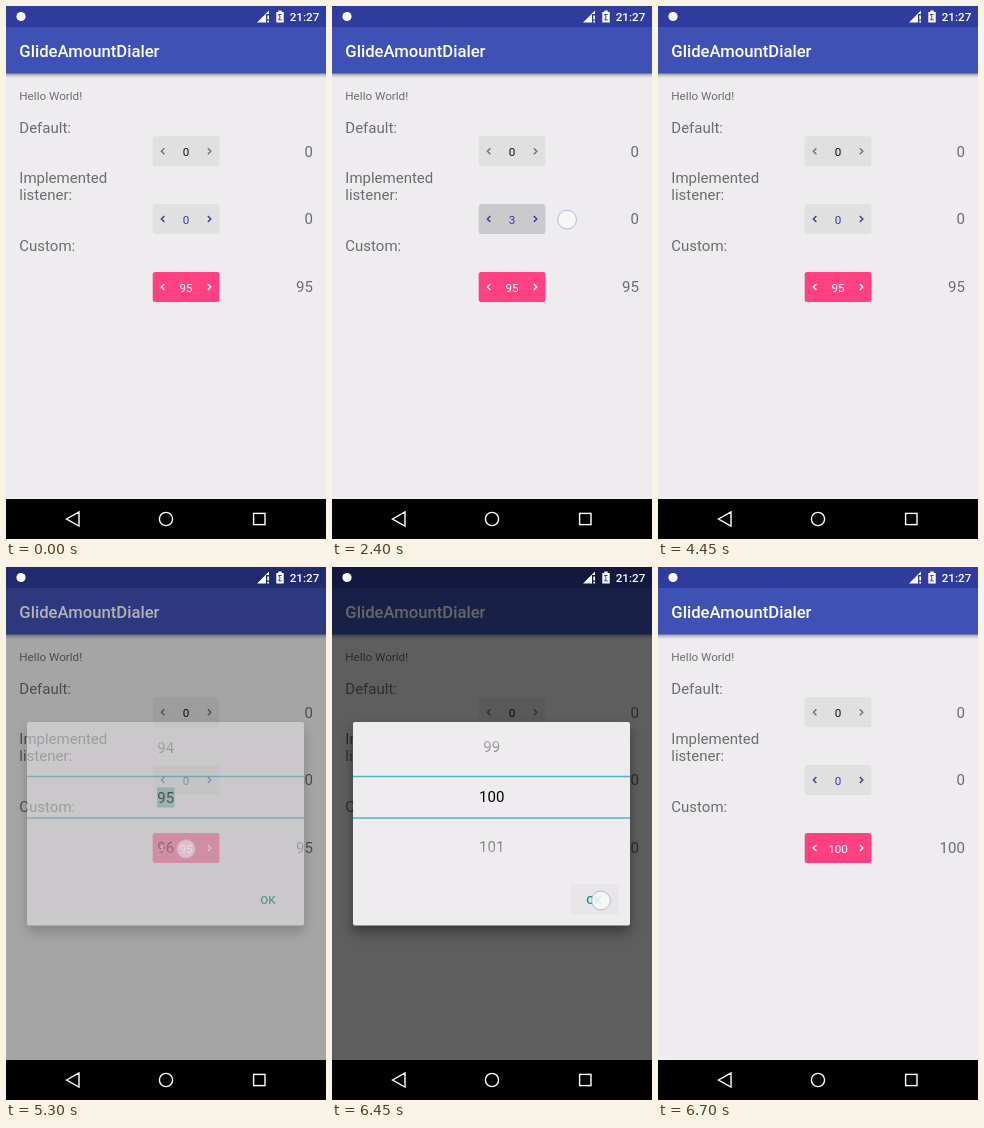
An HTML page for the animation above (6.75 s loop, 320 by 533 pixels).

```html
<!DOCTYPE html>
<html lang="en">
<head>
<meta charset="utf-8">
<title>Number picker demo</title>
<style>
  html, body { margin: 0; width: 100%; height: 100%; overflow: hidden; background: #eeecee; }
  svg { display: block; width: 100%; height: 100%; }
  text { font: 400 15px Roboto, sans-serif; fill: #6d6c6e; }
  .small { font-size: 11.67px; }
  .medium { font-weight: 500; }
  .mid { text-anchor: middle; }
  .end { text-anchor: end; }
  .line { fill: none; stroke: #fff; stroke-width: 1.4; }
  .picker path { fill: none; stroke-width: 1.4; }
  #card { filter: drop-shadow(0 7px 6px rgba(0, 0, 0, .38)); }
  #wheel text { fill: #000; }
</style>
</head>
<body>
<svg viewBox="0 0 320 533">
  <defs>
    <linearGradient id="shade" x2="0" y2="1">
      <stop offset="0" stop-opacity=".34"/>
      <stop offset="1" stop-opacity="0"/>
    </linearGradient>
    <linearGradient id="fade" gradientUnits="userSpaceOnUse" x1="0" y1="156" x2="0" y2="306">
      <stop offset="0" stop-color="#fff" stop-opacity="0"/>
      <stop offset=".45" stop-color="#fff"/>
      <stop offset=".55" stop-color="#fff"/>
      <stop offset="1" stop-color="#fff" stop-opacity="0"/>
    </linearGradient>
    <mask id="edges" maskUnits="userSpaceOnUse" x="21" y="156" width="277" height="150">
      <rect x="21" y="156" width="277" height="150" fill="url(#fade)"/>
    </mask>
  </defs>

  <rect width="320" height="533" fill="#eeecee"/>
  <rect y="67" width="320" height="5" fill="url(#shade)"/>
  <rect width="320" height="21" fill="#303c9d"/>
  <rect y="21" width="320" height="46.5" fill="#3f51b5"/>
  <text class="medium" x="13.3" y="51" style="font-size:16.67px;fill:#fff">GlideAmountDialer</text>

  <text class="small" x="13.3" y="93.5">Hello World!</text>
  <text x="13.3" y="126.5">Default:</text>
  <text x="13.3" y="176.7">Implemented</text>
  <text x="13.3" y="194.3">listener:</text>
  <text x="13.3" y="244.6">Custom:</text>
  <g id="rows"></g>

  <rect id="dim" width="320" height="493" opacity="0"/>

  <circle cx="15" cy="10.5" r="4.6" fill="#fff"/>
  <path d="M251 16.5 263 4.5V8H260V16.5Z" fill="#fff"/>
  <path d="M261.3 9.5h1.7v4h-1.7zM261.3 14.8h1.7v1.7h-1.7z" fill="#fff"/>
  <path d="M270.3 6h2v-1.5h3.4V6h2v10.5h-7.4z" fill="#fff"/>
  <path d="M275.6 8.5h-3l1.6 2.5-1.6 2.8h3.2" fill="none" stroke="#303c9d"/>
  <text class="small medium end" x="313.3" y="15" style="fill:#fff">21:27</text>

  <g id="dialog" opacity="0">
    <rect id="card" x="21" y="155" width="277" height="203.5" rx="2" fill="#eeecee"/>
    <rect id="mark" x="151" y="220.5" width="17.5" height="20" fill="#84c5bd"/>
    <g mask="url(#edges)"><g id="wheel"></g></g>
    <path d="M21 209.5H298M21 251H298" stroke="#55b4ca" stroke-width="1.7"/>
    <rect id="okBg" x="238" y="317" width="49" height="31" rx="2" fill="#e8e6e9"/>
    <text class="small medium mid" x="262" y="336.5" style="fill:#009688">OK</text>
  </g>

  <rect y="493" width="320" height="40"/>
  <path class="line" d="M60.5 513 73 506V520Z"/>
  <circle class="line" cx="160" cy="513" r="6.6"/>
  <rect class="line" x="247.6" y="507.4" width="11.4" height="11.2"/>

  <circle id="touch" r="9.4" fill="#f8f8fb" fill-opacity=".86" stroke="#b3b7d2" opacity="0"/>
</svg>
<script>
const LOOP = 6750, FADE = 200;
const $ = id => document.getElementById(id);
const clamp = (v, a = 0, b = 1) => Math.min(b, Math.max(a, v));
const ramp = (t, a, b) => clamp((t - a) / (b - a));
const mix = (a, b, p) => a + (b - a) * p;

const rows = [
  { y: 145.3, bg: '#e1e0e1', hot: '#cac9cb', ink: '#111', arrow: '#747375', start: 0 },
  { y: 213, bg: '#e1e0e1', hot: '#cac9cb', ink: '#303f9f', arrow: '#303f9f', start: 0 },
  { y: 281, bg: '#ff4081', hot: '#e43973', ink: '#fff', arrow: '#fff', start: 95 }
];

// Finger swipes: down, end of movement, release; x and y ranges; values; pixels per unit
const swipes = [
  { row: 2, down: 100, stop: 550, up: 550, x: [178, 309], y: [284, 279], bulge: 0, from: 95, to: 105, unit: 13 },
  { row: 2, down: 1150, stop: 1500, up: 1500, x: [180, 49], y: [287, 287], bulge: 1, from: 105, to: 95, unit: 13 },
  { row: 1, down: 2250, stop: 2550, up: 2550, x: [180, 311], y: [217, 209], bulge: 0, from: 0, to: 8, unit: 16 },
  { row: 1, down: 3200, stop: 3800, up: 4250, x: [188, 28], y: [226, 212], bulge: 3, from: 8, to: 0, unit: 13 }
];
const openTap = { down: 5100, up: 5200, at: () => [180, 282] };
const drag = { down: 5550, up: 5700, at: t => [172, 300 - scrolled(t)] };
const okTap = { down: 6250, up: 6450, at: () => [269, 333.5] };

for (const s of swipes) {
  s.at = t => {
    const p = ramp(t, s.down, s.stop) ** 1.25;
    return [mix(...s.x, p), mix(...s.y, p) + s.bulge * 4 * p * (1 - p)];
  };
  s.value = t => {
    const n = Math.floor(Math.abs(s.at(t)[0] - s.x[0]) / s.unit);
    return s.from + Math.sign(s.to - s.from) * Math.min(n, Math.abs(s.to - s.from));
  };
}
const touches = [...swipes, openTap, drag, okTap];

function scrolled(t) {
  return 251 * (1 - (1 - ramp(t, 5550, 6200)) ** 2);
}

$('rows').innerHTML = rows.map(({ y, ink, arrow }) => `
  <g class="picker">
    <rect x="146.7" y="${y - 15}" width="66.7" height="30" rx="2.5"/>
    <path d="M158.4 ${y - 3}l-3 3 3 3M201.8 ${y - 3}l3 3-3 3" stroke="${arrow}"/>
    <text class="small mid" x="180" y="${y + 4.8}" style="fill:${ink}"></text>
  </g>
  <text class="end result" x="306.9" y="${y + 5.2}"></text>`).join('');
const boxes = document.querySelectorAll('.picker rect');
const values = document.querySelectorAll('.picker text');
const results = document.querySelectorAll('.result');

for (let n = 93; n <= 102; n++) {
  $('wheel').innerHTML += `<text class="mid" x="159.7" y="${236.3 + (n - 95) * 50}">${n}</text>`;
}

function drawRow(row, i, t) {
  let value = row.start, result = row.start, hot = false;
  for (const s of swipes) {
    if (s.row !== i || t < s.down) continue;
    value = s.value(t);
    if (t >= s.up) result = value;
    hot = t <= s.stop && t < s.up;
  }
  if (i === 2) {
    if (t >= openTap.down && t < openTap.up) hot = true;
    if (t >= drag.down) value = result = 95 + Math.round(scrolled(t) / 50);
  }
  boxes[i].setAttribute('fill', hot ? row.hot : row.bg);
  values[i].textContent = value;
  results[i].textContent = result;
}

function drawTouch(t) {
  const f = touches.find(f => t >= f.down && t < f.up + FADE);
  $('touch').setAttribute('opacity', f ? 1 - ramp(t, f.up, f.up + FADE) : 0);
  if (!f) return;
  const [x, y] = f.at(Math.min(t, f.up));
  $('touch').setAttribute('cx', x);
  $('touch').setAttribute('cy', y);
}

function draw(t) {
  rows.forEach((row, i) => drawRow(row, i, t));
  const shown = ramp(t, 5200, 5400) - ramp(t, 6500, 6700);
  $('dim').setAttribute('opacity', .6 * shown);
  $('dialog').setAttribute('opacity', shown);
  $('mark').setAttribute('opacity', t < drag.down ? 1 : 0);
  $('okBg').setAttribute('opacity', t >= okTap.down ? 1 : 0);
  $('wheel').setAttribute('transform', `translate(0 ${-scrolled(t)})`);
  drawTouch(t);
}

const begin = performance.now();
function tick() {
  const t = (performance.now() - begin) % LOOP;
  draw(Math.floor(t / 50) * 50);
  requestAnimationFrame(tick);
}
tick();
</script>
</body>
</html>
```
